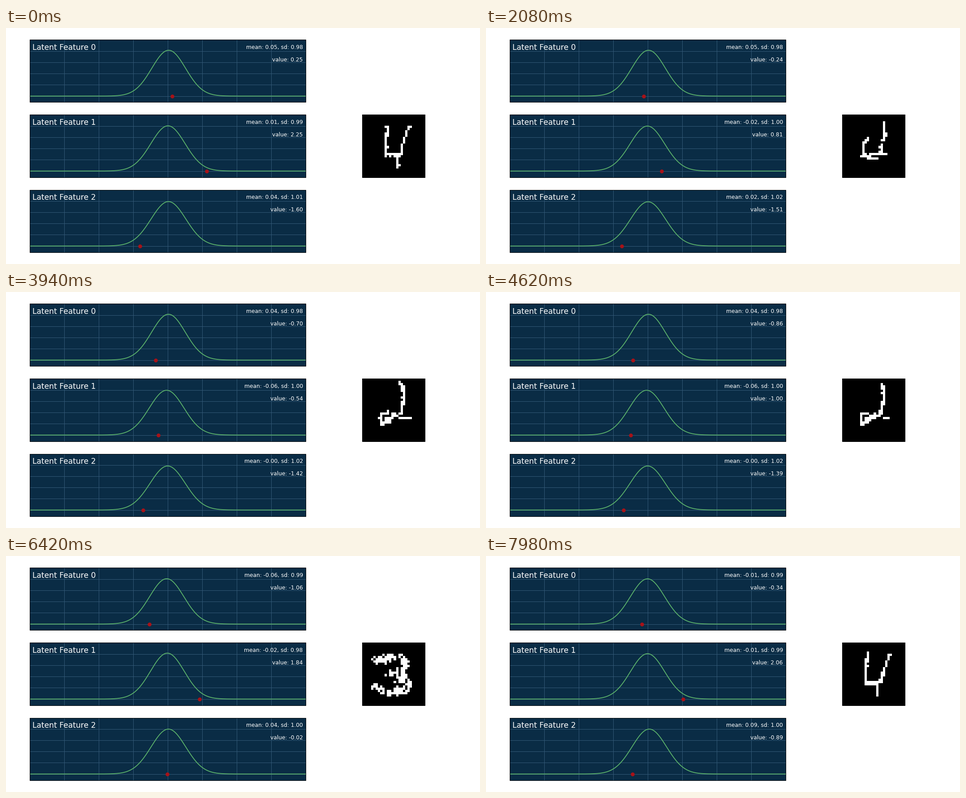
A matplotlib script that plays this animation: 1058 by 529 pixels, repeating every 8000 ms.

```python
import numpy as np
import matplotlib.pyplot as plt
from matplotlib.animation import FuncAnimation
from matplotlib.patches import Rectangle

W, H, DPI = 1058, 529, 64
PX = 72 / DPI                      # points per pixel
PT = W / 12 / DPI                  # scale for sizes given on a 12 inch wide page
CELLS = 28
JUMP = 100                         # step at which the second path starts

NAVY, GRID, GREEN, RED = "#0a2c45", "#355b79", "#5bb26b", "#a81218"

# A 3 x 3 page grid with 5 % margins and gaps of a fifth of a cell;
# the panels are two cells wide, the picture is a square in the last column.
CELL_W, CELL_H = 0.9 * W / 3.4, 0.9 * H / 3.4
LEFT, WIDTH = 0.05 * W, 2.2 * CELL_W
TOPS = [0.05 * H + 1.2 * CELL_H * i for i in range(3)]
UNIT, X0 = WIDTH / 16, LEFT + WIDTH / 2        # values run from -8 to 8
DENSITY = CELL_H / 0.555                       # densities from -0.055 to 0.5
ZERO = 0.5 * DENSITY
PICTURE_X = 0.95 * W - CELL_W / 2 - CELL_H / 2

# Pen strokes in cell coordinates: left arm, right arm, bar, tail.
FOUR = [np.array(s) for s in (
    [(11, 5), (10, 10), (10, 17)],
    [(20.5, 5), (19.5, 7), (18, 11), (16.5, 17)],
    [(10, 17.5), (13, 17.5), (17, 17)],
    [(15.5, 18), (15, 20.5), (15, 23)])]
TWO = [np.array(s) for s in (
    [(11, 15), (8, 15), (8, 19)],
    [(16, 1.5), (17.5, 3), (18, 8), (16.5, 15)],
    [(10, 18), (13, 16), (20, 17)],
    [(8, 19.5), (12, 18), (14, 15)])]
THREE = [np.array(s) for s in (
    [(5.5, 7.5), (12, 6), (17, 6.5), (19, 9), (17, 12), (13, 13)],
    [(13, 13), (17, 14), (20, 18), (18, 21.5), (11, 21.7), (4.5, 18.8)])]


def ink(strokes, radius):
    """Chance that each cell is white, falling off with distance to the strokes."""
    y, x = np.mgrid[:CELLS, :CELLS]
    cells = np.stack([x, y], axis=-1)
    dist = np.full((CELLS, CELLS), np.inf)
    for pts in strokes:
        for a, b in zip(pts, pts[1:]):
            d = b - a
            t = np.clip((cells - a) @ d / (d @ d), 0, 1)
            near = a + t[..., None] * d
            dist = np.minimum(dist, np.hypot(*np.moveaxis(cells - near, -1, 0)))
    return 1 / (1 + np.exp((dist - radius) / 0.15))


def morph(u):
    """Bend the four into the two."""
    return ink([a + (b - a) * u for a, b in zip(FOUR, TWO)], 0.65)


def dissolve(u):
    """Let the bold three crumble into the thin four."""
    mix = u ** 1.5
    return (1 - mix) * ink(THREE, 1.6) + mix * ink(FOUR, 0.65)


def drift(u, start, end, sway=0, halves=1):
    return start + (end - start) * u + sway * np.sin(np.pi * halves * u)


# Per feature: value (start, slope), then mean and deviation as drift arguments.
FIRST = dict(origin=0, span=85, shape=morph, features=[
    ((0.248, -0.0112), (0.0549, 0.042, 0.005, 2), (0.98, 0.98)),
    ((2.25, -0.0328), (0.0149, -0.0645, 0.008), (0.993, 1.003)),
    ((-1.603, 0.00213), (0.042, -0.004), (1.011, 1.02))])
SECOND = dict(origin=113, span=58, shape=dissolve, features=[
    ((-1.57, 0.0212), (-0.072, -0.012, -0.012), (0.988, 0.992)),
    ((1.68, 0.0066), (-0.03, -0.01), (0.97, 0.99)),
    ((0.603, -0.0258), (0.08, 0.09, -0.046), (1, 1))])

plt.rcParams["font.family"] = "DejaVu Sans"
fig = plt.figure(figsize=(W / DPI, H / DPI), dpi=DPI, facecolor="white")
ax = fig.add_axes([0, 0, 1, 1])
ax.axis("off")

z = np.linspace(-8, 8, 400)


def frame(x, y, width, height):
    ax.add_patch(Rectangle((x, y), width, height, fill=False, ec="black",
                           lw=0.8 * PT, snap=True, zorder=4))


def make_panel(index, top):
    right, bottom = LEFT + WIDTH, top + CELL_H
    ax.add_patch(Rectangle((LEFT, top), WIDTH, CELL_H, fc=NAVY, lw=0))
    rule = dict(color=GRID, lw=0.8 * PT, snap=True, solid_capstyle="butt")
    for v in range(-6, 7, 2):
        ax.plot([X0 + v * UNIT] * 2, [top, bottom], **rule)
    for j in range(5):
        ax.plot([LEFT, right], [top + ZERO - j * DENSITY / 10] * 2, **rule)
    frame(LEFT, top, WIDTH, CELL_H)
    curve, = ax.plot([], [], color=GREEN, lw=1.5 * PT, solid_capstyle="butt")
    dot, = ax.plot([], [], "o", color=RED, ms=6 * PT, mew=PT, zorder=5)
    ax.text(LEFT + 0.01 * WIDTH, top + 22.5, f"Latent Feature {index}",
            color="white", size=14 * PT, zorder=6)
    stats, value = (ax.text(LEFT + 0.99 * WIDTH, top + dy, "", color="white",
                            ha="right", size=10 * PT, zorder=6)
                    for dy in (20.5, 48.7))
    return curve, dot, stats, value


panels = [make_panel(i, top) for i, top in enumerate(TOPS)]
picture = ax.imshow(np.zeros((CELLS, CELLS)), cmap="gray", vmin=0, vmax=1,
                    interpolation="nearest", aspect="auto",
                    extent=(PICTURE_X, PICTURE_X + CELL_H, TOPS[1] + CELL_H, TOPS[1]))
frame(PICTURE_X, TOPS[1], CELL_H, CELL_H)
ax.set_xlim(0, W)
ax.set_ylim(H, 0)


def step_at(tick):
    """Three steps per 140 ms: two short ones around one long one."""
    cycle, part = divmod(tick, 7)
    return 3 * cycle + (0 if part == 0 else 2 if part == 6 else 1)


def update(tick):
    step = step_at(tick)
    path = FIRST if step < JUMP else SECOND
    elapsed = step - path["origin"]
    u = np.clip(elapsed / path["span"], 0, 1)
    for top, parts, feature in zip(TOPS, panels, path["features"]):
        curve, dot, stats, value = parts
        (start, slope), mean_args, sd_args = feature
        v = start + slope * elapsed
        mean, sd = drift(u, *mean_args), drift(u, *sd_args)
        pdf = np.exp(-0.5 * ((z - mean) / sd) ** 2) / (sd * np.sqrt(2 * np.pi))
        curve.set_data(X0 + z * UNIT, top + ZERO - pdf * DENSITY)
        dot.set_data([X0 + v * UNIT], [top + ZERO])
        stats.set_text(f"mean: {mean:.2f}, sd: {sd:.2f}")
        value.set_text(f"value: {v:.2f}")
    chance = np.random.default_rng(step).random((CELLS, CELLS))
    picture.set_data((path["shape"](u) > 0.04 + 0.92 * chance).astype(float))
    return [picture]


anim = FuncAnimation(fig, update, frames=400, interval=20, repeat=True,
                     repeat_delay=0, blit=False)
plt.show()
```
